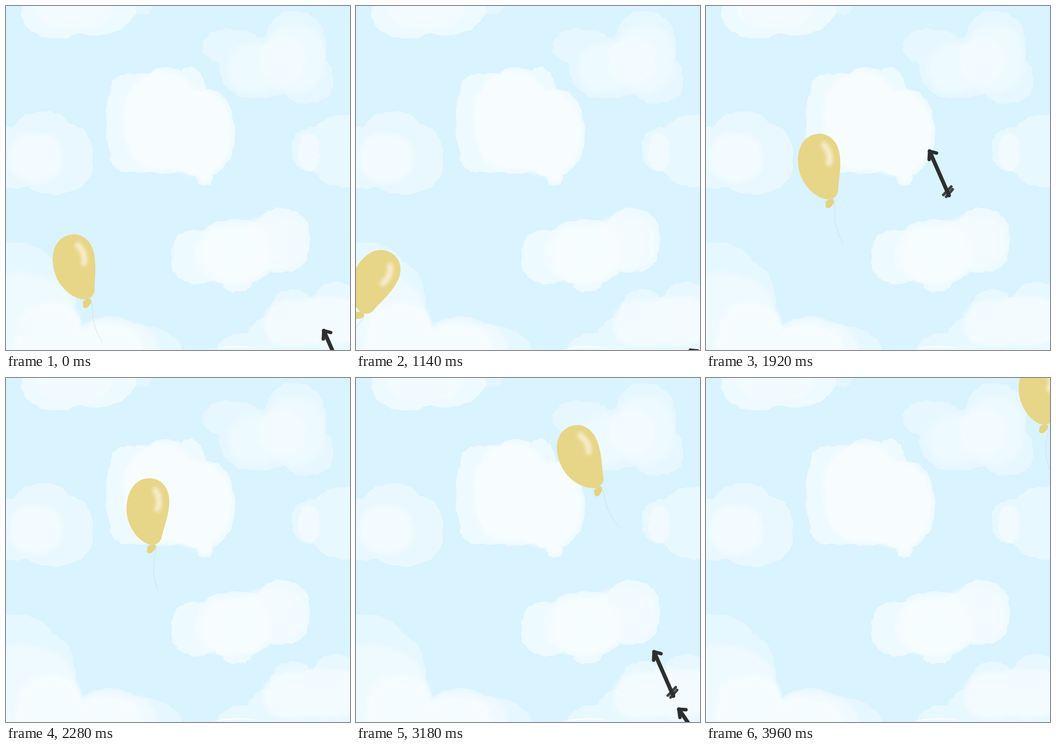
Animation of 748x748 px, one loop 4020 ms. Source, as an HTML page:

```html
<!DOCTYPE html>
<html lang="en">
<head>
<meta charset="utf-8">
<title>Balloon and arrows</title>
<style>
  html, body { margin: 0; width: 100%; height: 100%; overflow: hidden; background: #d9f3ff; }
  svg { position: absolute; left: 0; top: 0; width: 100%; height: 100%; }
  #sky { will-change: transform; }
</style>
</head>
<body>
<svg id="sky" viewBox="0 0 748 748">
  <defs>
    <filter id="soft" x="-20%" y="-20%" width="140%" height="140%"><feGaussianBlur stdDeviation="5"/></filter>
  </defs>
  <g id="clouds" fill="#f8fdff"></g>
  <path d="M446 747Q500 734 551 744Q500 740 446 747Z" fill="#fff"/>
</svg>
<svg viewBox="0 0 748 748">
  <defs>
    <filter id="glow" x="-150%" y="-50%" width="400%" height="200%"><feGaussianBlur stdDeviation="3.5"/></filter>
    <g id="arrow" fill="none" stroke="#2d2f2f" stroke-linecap="round" stroke-linejoin="round">
      <path d="M-1 0L41 96" stroke-width="8.5"/>
      <path d="M-2 18L-1 0L14 4" stroke-width="7.5"/>
      <path d="M29 95L46 77M35 99L49 83" stroke-width="6" opacity=".9"/>
    </g>
  </defs>
  <g id="balloon">
    <path d="M-9 -3C-2 -8 5 -10 10 -5C11 -1 9 3 6 5C3 7 1 11 -4 11C-9 11 -12 6 -9 3Z" fill="#e6d37f"/>
    <path d="M-4 -152C24 -152 39 -128 39 -103C39 -72 27 -45 22 -22C18 -10 8 -7 0 -7C-28 -12 -54 -48 -54 -85C-54 -122 -36 -152 -4 -152Z" fill="#e7d687"/>
    <path d="M9 -126Q22 -106 13 -85" fill="none" stroke="#f6eccb" stroke-width="13" stroke-linecap="round" filter="url(#glow)"/>
    <path d="M-7 -4Q0 -8 8 -8C14 3 6 20 5 38C4 58 8 77 14 92" fill="none" stroke="#c9dce2" stroke-width=".8"/>
  </g>
  <g id="arrows"></g>
</svg>
<script>
const LOOP = 4020, STEP = 60, FLIGHT = 540;
const NS = 'http://www.w3.org/2000/svg';
const byId = id => document.getElementById(id);

function add(parent, tag, attrs) {
  const el = document.createElementNS(NS, tag);
  for (const key in attrs) el.setAttribute(key, attrs[key]);
  return parent.appendChild(el);
}

let seed = 7;
const random = () => (seed = seed * 16807 % 2147483647) / 2147483647;

// Squarish oval with a ragged, brushed edge.
function puff(cx, cy, rx, ry) {
  const squared = v => Math.sign(v) * Math.abs(v) ** .85;
  const phases = [5, 11, 19].map(n => [n, random() * 2 * Math.PI]);
  const points = Array.from({ length: 90 }, (_, i) => {
    const a = i / 90 * 2 * Math.PI;
    const rag = phases.reduce((sum, [n, phase]) => sum + Math.sin(n * a + phase), 0);
    const x = cx + (rx + rag) * squared(Math.cos(a));
    const y = cy + (ry + rag) * squared(Math.sin(a));
    return x.toFixed(1) + ' ' + y.toFixed(1);
  });
  return 'M' + points.join('L') + 'Z';
}

// One wash of paint: several puffs merged under a single opacity.
function wash(opacity, soft, ...puffs) {
  const group = add(byId('clouds'), 'g', { opacity });
  if (soft) group.setAttribute('filter', 'url(#soft)');
  for (const p of puffs) add(group, 'path', { d: puff(...p) });
}

// top left
wash(.62, false, [110, 8, 76, 62], [185, -5, 98, 68]);
wash(.35, false, [295, -5, 25, 24]);
wash(.6, true, [150, 0, 85, 50]);
// top right
wash(.42, false, [490, 88, 62, 38], [550, 135, 85, 66], [628, 100, 68, 89], [655, 160, 57, 52]);
wash(.4, true, [628, 115, 65, 76], [540, 135, 58, 55]);
wash(.55, true, [600, 118, 50, 48]);
// centre
wash(.66, false, [300, 255, 84, 108], [348, 250, 70, 116], [400, 195, 33, 62],
  [425, 275, 72, 95], [432, 360, 19, 31], [265, 325, 38, 36], [262, 190, 35, 42]);
wash(.92, true, [340, 250, 84, 106], [410, 275, 80, 92], [432, 355, 16, 28]);
// left
wash(.52, false, [80, 305, 70, 76], [105, 330, 85, 79], [20, 330, 60, 67]);
wash(.6, true, [65, 330, 58, 52]);
// right
wash(.48, false, [735, 315, 72, 79], [675, 312, 54, 49]);
wash(.48, false, [659, 318, 23, 41]);
// lower centre
wash(.62, false, [415, 545, 56, 59], [500, 535, 85, 71], [600, 510, 61, 70], [502, 585, 36, 37]);
wash(.6, true, [580, 515, 72, 58], [490, 540, 80, 62]);
wash(.6, true, [500, 540, 70, 62]);
// lower left
wash(.4, false, [10, 620, 106, 107], [70, 660, 82, 110], [60, 720, 105, 100], [225, 740, 76, 64], [280, 770, 105, 76]);
wash(.5, true, [30, 680, 120, 100], [110, 710, 55, 70], [225, 750, 80, 70], [265, 770, 70, 80]);
wash(.75, true, [95, 735, 75, 90], [220, 760, 80, 68]);
// lower right
wash(.48, false, [622, 690, 50, 74], [720, 690, 65, 89], [590, 740, 70, 65], [540, 760, 85, 50], [690, 730, 90, 100]);
wash(.68, true, [620, 690, 60, 50], [700, 685, 90, 52]);

// Turning points of the swaying flight: time, knot x, knot y, tilt.
const sway = [
  [0, 176, 645, -13], [420, 117, 685, 3], [1140, 7, 672, 28], [1620, 47, 553, 27],
  [1980, 302, 408, -14], [2280, 316, 370, 0], [2670, 241, 248, 24],
  [3180, 526, 245, -22], [3720, 640, 104, 19], [3960, 734, 109, 0]
];

// Smooth value through the keys, with tangents from the neighbours.
function follow(keys, t) {
  let i = 0;
  while (i < keys.length - 2 && t >= keys[i + 1][0]) i++;
  const a = keys[i], b = keys[i + 1];
  const before = keys[i - 1] || a, after = keys[i + 2] || b;
  const span = b[0] - a[0], u = (t - a[0]) / span;
  return a.slice(1).map((va, k) => {
    const j = k + 1, vb = b[j];
    const ma = span * (vb - before[j]) / (b[0] - before[0]);
    const mb = span * (after[j] - va) / (after[0] - a[0]);
    return va + u * (ma + u * (3 * (vb - va) - 2 * ma - mb + u * (2 * (va - vb) + ma + mb)));
  });
}

// Arrows speed up along a quadratic curve: start, control, end.
const steep = { curve: [[692, 706], [570, 358], [358, 182]], turn: 0 };
const shallow = { curve: [[703, 720], [477, 463], [323, 222]], turn: -10.7 };

function along([a, b, c], u) {
  const p = u * (.55 + .45 * u), q = 1 - p;
  return [0, 1].map(k => q * q * a[k] + 2 * p * q * b[k] + p * p * c[k]);
}

const shots = [[0, steep], [1200, shallow], [1512, steep], [3045, steep], [3180, shallow]]
  .map(([start, kind]) => ({ start, ...kind, el: add(byId('arrows'), 'use', { href: '#arrow' }) }));

function place(el, [x, y], angle) {
  el.setAttribute('transform', `translate(${x} ${y}) rotate(${angle})`);
}

function draw(t) {
  const [x, y, tilt] = follow(sway, t);
  place(byId('balloon'), [x, y], tilt);
  for (const { start, curve, turn, el } of shots) {
    const age = t - start;
    const flying = age >= -STEP && age <= FLIGHT;
    el.setAttribute('display', flying ? 'inline' : 'none');
    if (flying) place(el, along(curve, age / FLIGHT), turn);
  }
}

const began = performance.now();
function tick() {
  const t = (performance.now() - began) % LOOP;
  draw(Math.floor(t / STEP) * STEP);
  requestAnimationFrame(tick);
}
tick();
</script>
</body>
</html>
```
